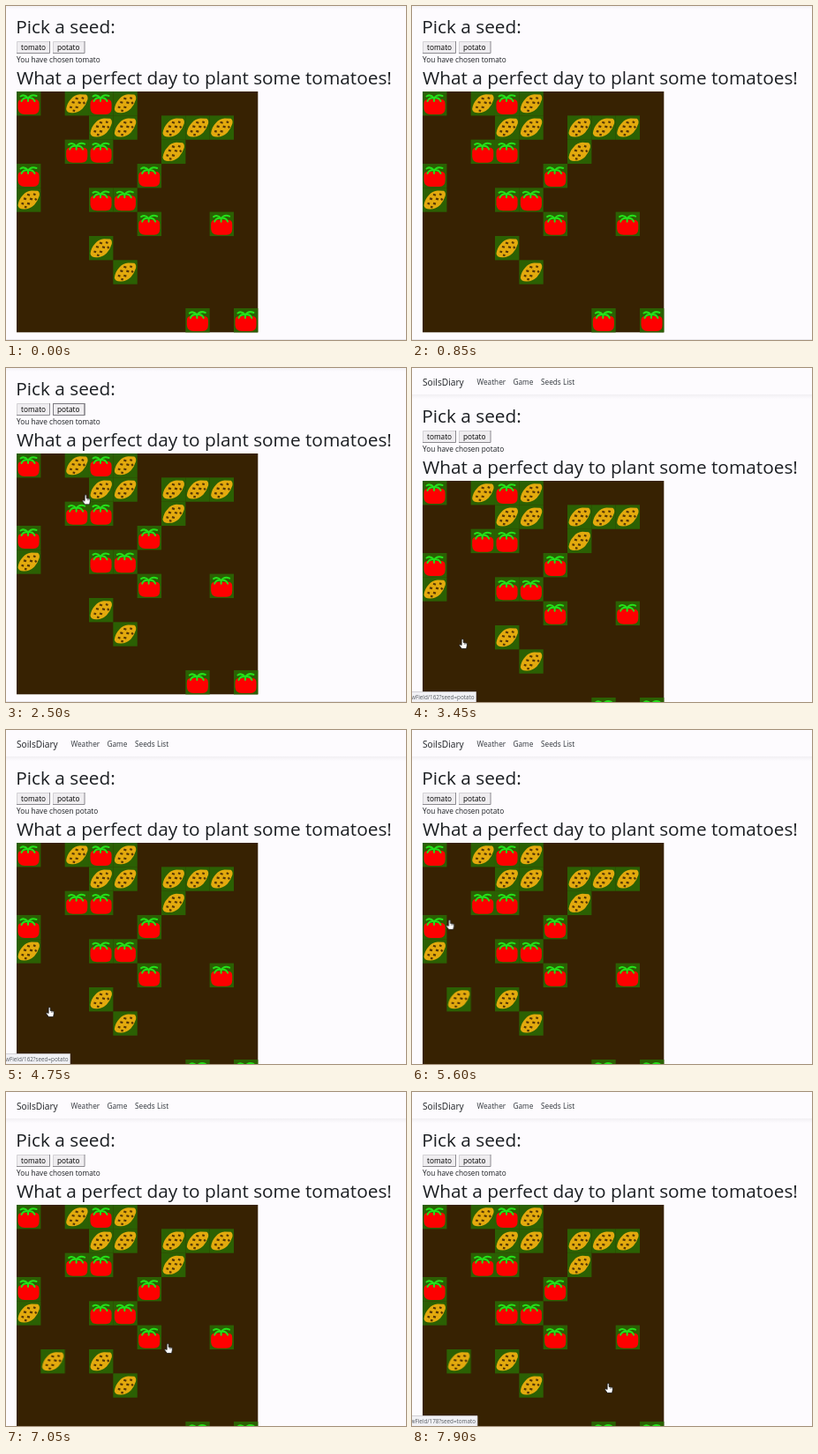
Animation, 453 px wide and 379 px high, one loop 8 s. Source, as an HTML page:

```html
<!DOCTYPE html>
<html lang="en">
<head>
<meta charset="utf-8">
<title>Pick a seed</title>
<style>
  html, body { margin: 0; width: 100%; height: 100%; overflow: hidden; background: #fdfbfe; }
  svg { display: block; width: 100vw; height: 100vh; }
  text { font: 8.25px "Open Sans", "Noto Sans", sans-serif; fill: #1c1f23; }
  .title { font-size: 20.8px; }
  .brand { font-size: 10.2px; }
  .link { fill: #2f343a; }
  .label { font-weight: 500; fill: #000; }
  .status text { font-size: 6.3px; fill: #555a60; text-anchor: end; }
</style>
</head>
<body>
<svg viewBox="0 0 453 379">
  <defs>
    <linearGradient id="shade" x2="0" y2="1">
      <stop offset="0" stop-color="#f1eff3"/>
      <stop offset="1" stop-color="#fdfbfe"/>
    </linearGradient>
    <g id="tomato">
      <rect width="27.4" height="27.4" fill="#2b6003"/>
      <path d="M1.5 14Q1.5 9 6 9H21Q25.6 9 25.6 14V19Q25.6 26 19 26H9Q2 26 1.5 19Z" fill="#fe0000"/>
      <path d="M4.5 5.5Q9 2.5 13 7.5Q16.5 2.5 22.5 5M13 7.5Q8 6 5.5 11M13 7.5Q18 6 20.5 11M13 7.5V11"
            fill="none" stroke="#25e01a" stroke-width="2" stroke-linecap="round"/>
    </g>
    <g id="potato">
      <rect width="27.4" height="27.4" fill="#2b6003"/>
      <path d="M1.5 20Q2.5 13 7 8.5Q11 3.5 17 3.2L24 3.5Q26.5 5 25.8 9Q24 15 20 19.5Q15 24.2 9 24.2Q2 24.5 1.5 20Z" fill="#e3aa0e"/>
      <path d="M12 7.5l3 1M19 7l2.5 1M8 12l3 .8M15 12.3l3 .8M21 12l1.5 2M5.5 17.5l2.6 .8M12 17.5l3 .8M9 21.5l2.5 .6"
            fill="none" stroke="#563806" stroke-width="2.2"/>
    </g>
  </defs>

  <g id="page">
    <rect y="30" width="453" height="5" fill="url(#shade)"/>
    <text class="brand" x="12" y="19.7">SoilsDiary</text>
    <text class="link" x="73.5" y="19.2">Weather</text>
    <text class="link" x="114.5" y="19.2">Game</text>
    <text class="link" x="146" y="19.2">Seeds List</text>

    <text class="title" x="11.3" y="61.8">Pick a seed:</text>
    <g id="buttons"></g>
    <text id="tomatoChosen" x="12" y="95.3">You have chosen tomato</text>
    <text id="potatoChosen" x="12" y="95.3">You have chosen potato</text>
    <text class="title" x="12" y="120.4">What a perfect day to plant some tomatoes!</text>

    <g id="field" transform="translate(12 128)">
      <rect width="273.3" height="273.3" fill="#372202"/>
    </g>
    <rect y="409" width="453" height="1" fill="#e9e7eb"/>
  </g>

  <g id="statuses"></g>

  <g id="cursor">
    <path d="M-1.9 -5Q-.8 -6.2 .2 -5V-1.6L3.4 -.9Q4.6 -.5 4.5 1L3.6 5.6H-1.6L-4.5 1.8Q-4.4 .2 -2.8 .9L-1.9 1.6Z"
          fill="#fff" stroke="#111" stroke-width=".8" stroke-linejoin="round"/>
    <path d="M1.3 -1.2V1M2.9 -.8V1.2" stroke="#333" stroke-width=".5"/>
  </g>
</svg>

<script>
const LOOP = 8000, CELL = 27.33, SCROLL = -31;
const RELOAD = { potato: 2700, planted: 5250, tomato: 6600 };
const $ = id => document.getElementById(id);

function add(parent, name, attrs, content) {
  const el = document.createElementNS('http://www.w3.org/2000/svg', name);
  for (const key in attrs) el.setAttribute(key, attrs[key]);
  if (content) el.textContent = content;
  return parent.appendChild(el);
}

function play(el, frames) {
  const anim = el.animate(frames, { duration: LOOP, iterations: Infinity });
  anim.startTime = 0;
}

// Hard switches: each step is [time, value] and holds until the next.
function steps(el, prop, table) {
  const frames = table.map(([t, v]) => ({ offset: t / LOOP, [prop]: v, easing: 'step-end' }));
  frames.push({ offset: 1, [prop]: table[table.length - 1][1] });
  play(el, frames);
}

function showBetween(el, from, to) {
  const table = [[0, 0], [from, 1]];
  if (to < LOOP) table.push([to, 0]);
  steps(el, 'opacity', table);
}

function button(x, width, label, focusFrom, focusTo) {
  const g = add($('buttons'), 'g', { transform: `translate(${x} 71)` });
  add(g, 'rect', { width, height: 14, fill: '#efedf0' });
  add(g, 'path', { d: `M.5 14V.5H${width}`, fill: 'none', stroke: '#d4d2d6' });
  add(g, 'path', { d: `M0 13.5H${width - .5}V0`, fill: 'none', stroke: '#8c8a90' });
  const ring = add(g, 'rect', { x: .5, y: .5, width: width - 1, height: 13, fill: 'none', stroke: '#7b7980' });
  add(g, 'text', { class: 'label', x: 5, y: 10.3 }, label);
  showBetween(ring, focusFrom, focusTo);
}

function plant(kind, col, row) {
  return add($('field'), 'use', { href: '#' + kind, x: col * CELL, y: row * CELL });
}

function status(width, label, from, to) {
  const g = add($('statuses'), 'g', { class: 'status' });
  add(g, 'path', { d: `M-1 367.5H${width}V380H-1Z`,
    fill: label ? '#f1f1f5' : '#fdfbfe', stroke: label ? '#c9c7cd' : '#eceaee', 'stroke-width': .8 });
  add(g, 'text', { x: width - 2, y: 376.2 }, label);
  showBetween(g, from, to);
}

button(12, 38, 'tomato', 6100, RELOAD.tomato);
button(53, 36.5, 'potato', 2150, RELOAD.potato);

// One string per row: t = tomato, p = potato.
['t.ptp', '...pp.ppp', '..tt..p', 't....t', 'p..tt', '.....t..t', '...p', '....p', '', '.......t.t']
  .forEach((line, row) => [...line].forEach((c, col) => {
    if (c !== '.') plant(c === 't' ? 'tomato' : 'potato', col, row);
  }));
showBetween(plant('potato', 1, 6), RELOAD.planted, LOOP);

steps($('tomatoChosen'), 'opacity', [[0, 1], [RELOAD.potato, 0], [RELOAD.tomato, 1]]);
showBetween($('potatoChosen'), RELOAD.potato, RELOAD.tomato);
steps($('page'), 'transform', [[0, `translateY(${SCROLL}px)`], [RELOAD.potato, 'translateY(0px)']]);

status(72.5, 'ViewField/162?seed=potato', 3150, RELOAD.planted);
status(43.5, '', 6300, 6480);
status(74, 'ViewField/178?seed=tomato', 7450, LOOP);

// Pointer path: [time, x, y]
const path = [
  [0, -12, 210], [1000, -12, 210], [1750, 72, 52], [2200, 72, 51], [2500, 91, 149],
  [3000, 66, 290], [3450, 58, 313], [4250, 55, 315], [4750, 50, 320], [5350, 50, 320],
  [5950, 34, 83], [6130, 34, 82], [6400, 109, 176], [6900, 170, 275], [7450, 221, 333],
  [7900, 223, 336], [8000, 223, 336]
];
play($('cursor'), path.map(([t, x, y]) => ({
  offset: t / LOOP, transform: `translate(${x}px, ${y}px)`, easing: 'linear'
})));
</script>
</body>
</html>
```
